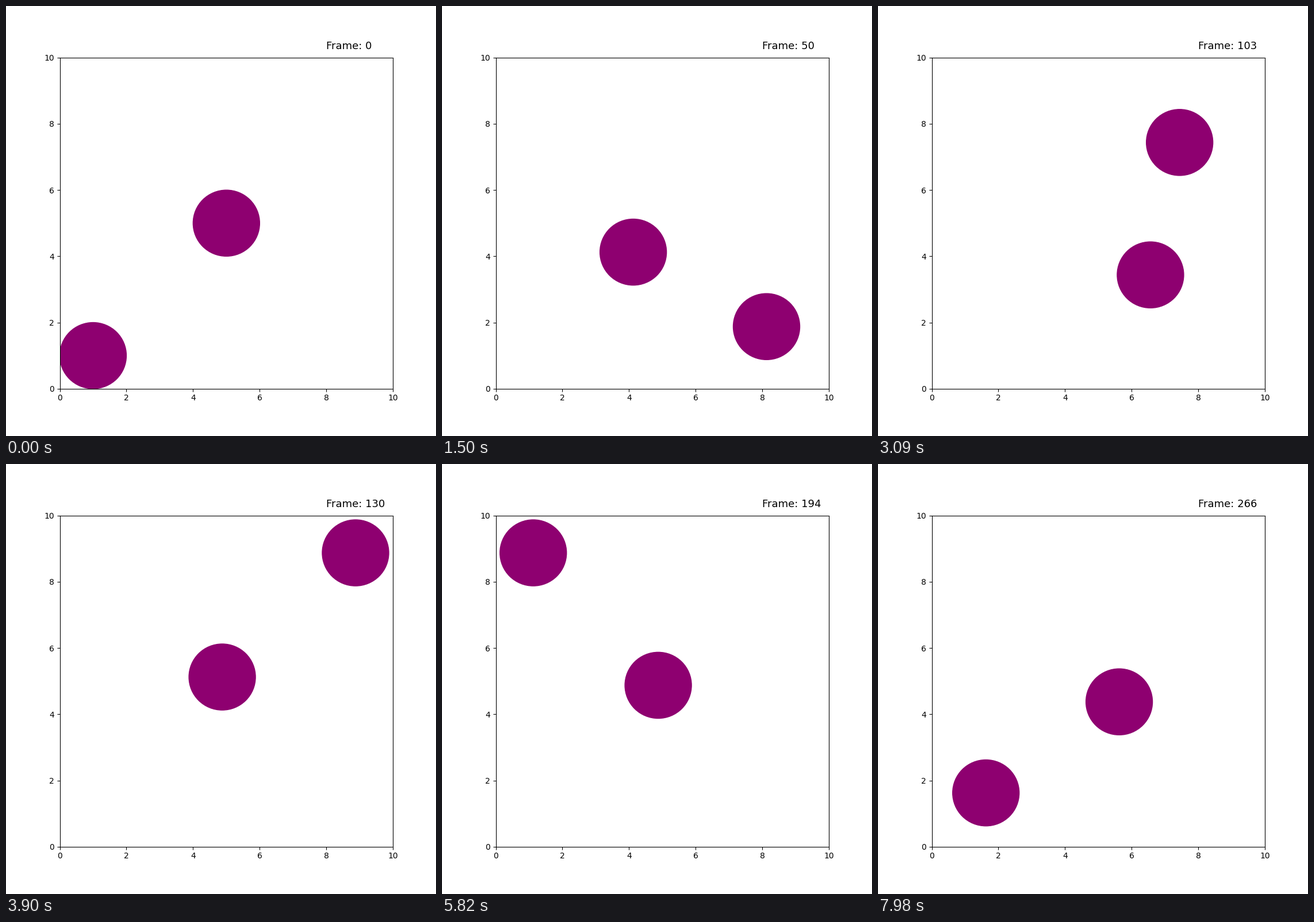
These frames come from a looping animation (748 by 748 pixels, 8 s). A matplotlib script:

```python
import matplotlib.pyplot as plt
from matplotlib.animation import FuncAnimation
from matplotlib.patches import Circle

SIZE, DPI = 748, 100
LOOP_MS, TICK_MS, STEP_MS = 8000, 20, 30
SPEED = 1 / 16
RADIUS = 1
LIMIT = 10
COLOR = "#8e0070"

# start x, start y, direction x, direction y
BALLS = [(1, 1, 1, 1), (5, 5, 1, -1)]


def bounce(start, direction, step):
    """Position on one axis, reflected between the two walls."""
    span = LIMIT - 2 * RADIUS
    offset = (start - RADIUS + direction * SPEED * step) % (2 * span)
    return RADIUS + span - abs(span - offset)


plt.rcParams["font.family"] = "DejaVu Sans"
fig, ax = plt.subplots(figsize=(SIZE / DPI, SIZE / DPI), dpi=DPI)
ax.set_xlim(0, LIMIT)
ax.set_ylim(0, LIMIT)

circles = [ax.add_patch(Circle((x, y), RADIUS, color=COLOR))
           for x, y, _, _ in BALLS]
label = ax.text(8, 10.25, "Frame: 0", fontsize=13)


def update(tick):
    step = (tick * TICK_MS + TICK_MS // 2) // STEP_MS
    for circle, (x, y, dx, dy) in zip(circles, BALLS):
        circle.center = bounce(x, dx, step), bounce(y, dy, step)
    label.set_text(f"Frame: {step}")
    return [*circles, label]


anim = FuncAnimation(fig, update, frames=LOOP_MS // TICK_MS, interval=TICK_MS,
                     init_func=lambda: update(0), repeat=True, repeat_delay=0)
plt.show()
```
